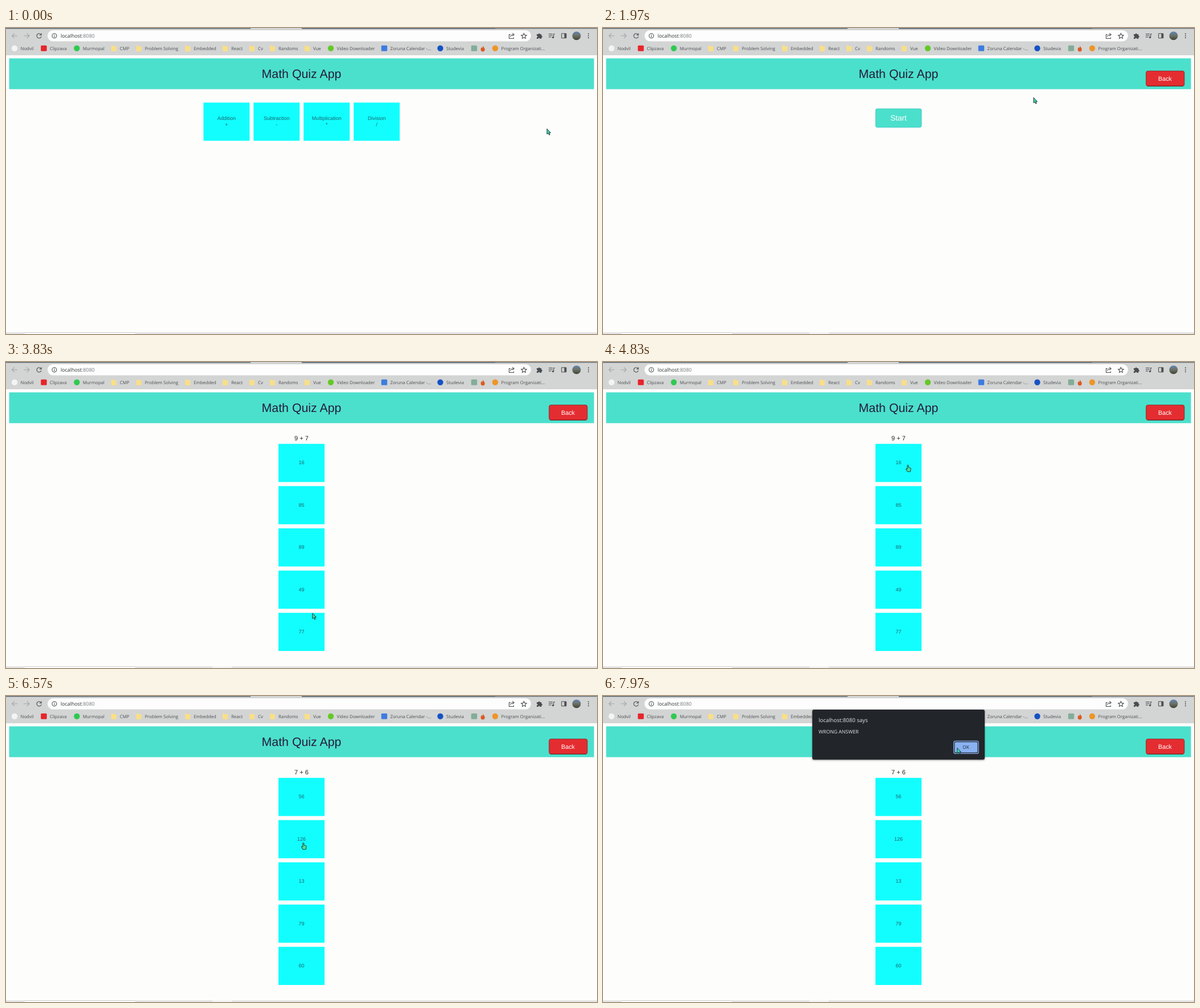
Write an HTML page that moves like this. It is 1039x539 px and loops after 8 s.

```html
<!DOCTYPE html>
<html lang="en">
<head>
<meta charset="utf-8">
<title>Math Quiz App</title>
<style>
  html, body { margin: 0; width: 100%; height: 100%; overflow: hidden; background: #fdfdfc; }
  svg { display: block; width: 100vw; height: 100vh; text-rendering: geometricPrecision; }
  .ui { font-family: "Open Sans", "Noto Sans", sans-serif; }
  .page { font-family: "Liberation Sans", Arial, sans-serif; text-anchor: middle; }
  .line { fill: none; stroke: #4a4d50; stroke-width: 1.1; }
  .off { stroke: #a2a4a6; }
</style>
</head>
<body>
<svg id="stage" viewBox="0 0 1039 539" xmlns="http://www.w3.org/2000/svg">
  <defs>
    <linearGradient id="photo" x1="0" y1="0" x2="0" y2="1">
      <stop offset="0" stop-color="#5d86b4"/>
      <stop offset=".5" stop-color="#6d7064"/>
      <stop offset="1" stop-color="#3c4434"/>
    </linearGradient>
    <filter id="soft" x="-10%" y="-20%" width="120%" height="150%">
      <feDropShadow dx="0" dy="1" stdDeviation="1.5" flood-color="#000" flood-opacity=".5"/>
    </filter>
  </defs>

  <rect width="1039" height="539" fill="#fdfdfc"/>
  <g id="browser" class="ui">
    <rect width="1039" height="48" fill="#d3d4d4"/>
    <rect width="430" height="1.4" fill="#57656a"/>
    <rect x="520" width="340" height="1.4" fill="#435260"/>
    <rect x="860" width="179" height="1.4" fill="#6c7478"/>
    <rect x="73" y="4" width="850" height="19.5" rx="9.7" fill="#fdfdfd"/>
    <path class="line off" d="M20 13.7H10.5M14.7 9.5l-4.2 4.2 4.2 4.2M31.5 13.7H41M36.8 9.5l4.2 4.2-4.2 4.2"/>
    <path class="line" stroke-width="1.3" d="M61.3 11.2a4.1 4.1 0 1 0 .9 3.6M62.2 9.2v3.2h-3.2"/>
    <circle class="line" cx="85" cy="13.8" r="4"/>
    <path class="line" d="M85 13v3M85 11.2v1"/>
    <path class="line" d="M887 11.5h-2.5v7h8v-2M886.8 15.6c.5-2.6 2.2-3.9 5-3.9M890.3 9.2l3 2.5-3 2.5"/>
    <path class="line" d="M910.5 9.4l1.4 3 3.3.4-2.5 2.2.7 3.3-2.9-1.7-2.9 1.7.7-3.3-2.5-2.2 3.3-.4z"/>
    <path fill="#4a4d50" d="M933 11h2.6a1.6 1.6 0 0 1 3.2 0h2.5v2.6a1.6 1.6 0 0 1 0 3.2v2.3h-2.7a1.5 1.5 0 0 0-3 0H933v-2.5a1.6 1.6 0 0 0 0-3.2z"/>
    <path class="line" d="M954 10.5h7M954 13.2h7M954 16h4.5M962.8 16.8v-6.3h2.2"/>
    <circle cx="961.6" cy="16.6" r="1.6" fill="#4a4d50"/>
    <rect class="line" x="976.7" y="9.7" width="8.2" height="8" rx=".7"/>
    <path fill="#4a4d50" d="M981.5 10h3.4v7.5h-3.4z"/>
    <circle cx="1003" cy="13.7" r="7.5" fill="url(#photo)"/>
    <g fill="#4a4d50"><circle cx="1024" cy="10.2" r="1"/><circle cx="1024" cy="13.7" r="1"/><circle cx="1024" cy="17.2" r="1"/></g>
    <text x="96" y="17" font-size="8.9" fill="#2d3033">localhost<tspan fill="#73777a">:8080</tspan></text>
    <rect y="536" width="1039" height="3" fill="#e4e4e4"/>
    <rect x="33" y="537" width="194" height="2" fill="#fff"/>
    <path d="M33 536.5h194" stroke="#c4c4c4" stroke-width=".8"/>
    <rect id="taskTab" x="363" y="536" width="34" height="3" fill="#f3f3f3"/>
  </g>

  <g class="page">
    <rect x="5.5" y="53.5" width="1028.2" height="54.2" fill="#4be0cc"/>
    <text x="519.5" y="88.2" font-size="21.35" fill="#251c39">Math Quiz App</text>
    <g id="back">
      <rect x="954.8" y="75.8" width="67.2" height="26.4" rx="3" fill="#e42d31" stroke="#8d2528" stroke-width=".9"/>
      <path d="M957 102.4h63" stroke="#5f2225" stroke-width=".9"/>
      <text x="988" y="92.6" font-size="10.8" fill="#fff">Back</text>
    </g>
    <g id="menu"></g>
    <g id="start">
      <rect x="479.3" y="142.2" width="80.6" height="32.8" rx="3" fill="#4be0cc" stroke="#35c3c0" stroke-width=".8"/>
      <text x="519.5" y="163" font-size="13.6" fill="#fff">Start</text>
    </g>
    <g id="first"></g>
    <g id="second"></g>
  </g>

  <g id="dialog" class="ui">
    <rect x="368" y="24" width="303" height="88" rx="3" fill="#23272a" filter="url(#soft)"/>
    <text x="379" y="46.3" font-size="9.6" fill="#e4e6e8">localhost:8080 says</text>
    <text x="379" y="65.6" font-size="8.7" fill="#e4e6e8">WRONG ANSWER</text>
    <rect x="616.6" y="79.4" width="43.6" height="22" rx="3" fill="#23272a" stroke="#8ab0ee" stroke-width="1.2"/>
    <rect x="618.4" y="81.2" width="40" height="18.4" rx="2" fill="#8ab2f2"/>
    <text x="638" y="93.2" font-size="8.2" fill="#20262e" text-anchor="middle">OK</text>
  </g>

  <g id="cursor" stroke="#1d2b2b" stroke-width=".9" stroke-linejoin="round">
    <path id="arrow" fill="#38d9b0" d="M0 0V9.6L2.2 7.6 3.8 11 5.3 10.3 3.8 7.1H6.6Z"/>
    <path id="hand" fill="#52dd9c" d="M-1 .8Q0-.6 1 .8V4.4L4.2 5.2Q5.4 5.6 5.2 7L4.4 11.8H-.8L-3.3 7.7Q-3.5 6.2-2.2 6.6L-1 7.6Z"/>
  </g>
</svg>

<script>
const LOOP = 8000;
const $ = id => document.getElementById(id);

function add(parent, tag, attrs, text = "") {
  const el = document.createElementNS("http://www.w3.org/2000/svg", tag);
  for (const key in attrs) el.setAttribute(key, attrs[key]);
  el.textContent = text;
  return parent.appendChild(el);
}

// Bookmarks: label, text x, icon colour, icon shape
const bookmarks = [
  ["Nodvil", 25.5, "#f4f4f4", "circle"],
  ["Clipzava", 77, "#e5252a", "square"],
  ["Murmopal", 135, "#2fc952", "circle"],
  ["CMP", 200], ["Problem Solving", 244], ["Embedded", 330],
  ["React", 396], ["Cv", 443], ["Randoms", 479], ["Vue", 540],
  ["Video Downloader", 581.5, "#63c927", "circle"],
  ["Zoruna Calendar -...", 675.5, "#3d7ce0", "square"],
  ["Studevia", 774, "#1552c4", "circle"],
  ["", 833.5, "#82ad98", "square"],
  ["Program Organizati...", 870.5, "#ed9527", "circle"]
];
for (const [label, x, fill = "#f9df86", shape] of bookmarks) {
  const bar = $("browser");
  if (shape === "circle") add(bar, "circle", { cx: x - 10.5, cy: 35.7, r: 5.2, fill });
  else if (shape) add(bar, "rect", { x: x - 15.7, y: 30.7, width: 10.4, height: 10, rx: 1.5, fill });
  else add(bar, "path", { d: `M${x - 15} 31h3.5l1 1.2h4.5v8.8h-9z`, fill });
  add(bar, "text", { x, y: 38.6, "font-size": 7.8, fill: "#4b4e50" }, label);
}
add($("browser"), "path", {
  d: "M838.2 30.5c.4 2.8 3.6 4 3.6 7.3a3.6 3.6 0 0 1-7.2 0c0-1.8 1-2.7 1.3-4 1 .5 1.3 1 1.4 1.8.9-1.5 1.2-3 .9-5.1z",
  fill: "#d95b22"
});

const TILE = { w: 81, h: 67.2 };
const inkTile = "#17666f";

function tile(parent, x, y, lines, textY) {
  add(parent, "rect", { x, y, width: TILE.w, height: TILE.h, fill: "#12fefe" });
  lines.forEach((line, i) => add(parent, "text",
    { x: x + TILE.w / 2, y: y + textY + i * 10.4, "font-size": 9, fill: inkTile }, line));
  return [x, y, x + TILE.w, y + TILE.h];
}

const menuBoxes = ["Addition +", "Subtraction -", "Multiplication *", "Division /"]
  .map((item, i) => tile($("menu"), 347.2 + i * 88, 131.4, item.split(" "), 31));

function quiz(id, question, answers) {
  add($(id), "text", { x: 519.5, y: 137.6, "font-size": 11, fill: "#222" }, question);
  return answers.map((n, i) => tile($(id), 479, 144.2 + i * 74.4, [n], 36.2));
}
const firstBoxes = quiz("first", "9 + 7", [16, 85, 89, 49, 77]);
const secondBoxes = quiz("second", "7 + 6", [56, 126, 13, 79, 60]);

const backBox = [954, 75, 1022, 102];
const scenes = [
  { at: 0, show: ["menu"], hot: menuBoxes },
  { at: 1270, show: ["back", "start"], hot: [backBox, [479, 142, 560, 175]] },
  { at: 2800, show: ["back", "first"], hot: [backBox, ...firstBoxes] },
  { at: 5070, show: ["back", "second"], hot: [backBox, ...secondBoxes] },
  { at: 6900, show: ["back", "second", "dialog"], hot: [] }
];
const layers = ["menu", "back", "start", "first", "second", "dialog"];

// Pointer stops: time, x, y
const stops = [
  [0, 951, 177.5], [120, 951, 177.5], [900, 393.5, 180], [1300, 393.5, 180],
  [1900, 757, 122.5], [2050, 757, 122.5], [2600, 528, 157], [2900, 528, 157],
  [3750, 538.8, 442.5], [3950, 538.8, 442.5], [4700, 536, 181.3], [5300, 536, 181.3],
  [6300, 522.8, 258.4], [6950, 522.8, 258.4], [7750, 622.8, 91.5], [8000, 622.8, 91.5]
];

function pointerAt(t) {
  const i = stops.findIndex(s => s[0] > t);
  const [t0, x0, y0] = stops[i - 1], [t1, x1, y1] = stops[i];
  const p = (t - t0) / (t1 - t0), e = p * p * (3 - 2 * p);
  return [x0 + (x1 - x0) * e, y0 + (y1 - y0) * e];
}

const toggle = (id, on) => $(id).setAttribute("visibility", on ? "visible" : "hidden");

function draw(t) {
  const scene = scenes.filter(s => s.at <= t).pop();
  layers.forEach(id => toggle(id, scene.show.includes(id)));
  toggle("taskTab", t >= 870);

  const [x, y] = pointerAt(t);
  const over = scene.hot.some(b => x > b[0] && x < b[2] && y > b[1] + 1 && y < b[3]);
  toggle("hand", over);
  toggle("arrow", !over);
  $("cursor").setAttribute("transform", `translate(${x} ${y})`);
}

const begin = performance.now();
function tick() {
  draw((performance.now() - begin) % LOOP);
  requestAnimationFrame(tick);
}
tick();
</script>
</body>
</html>
```
